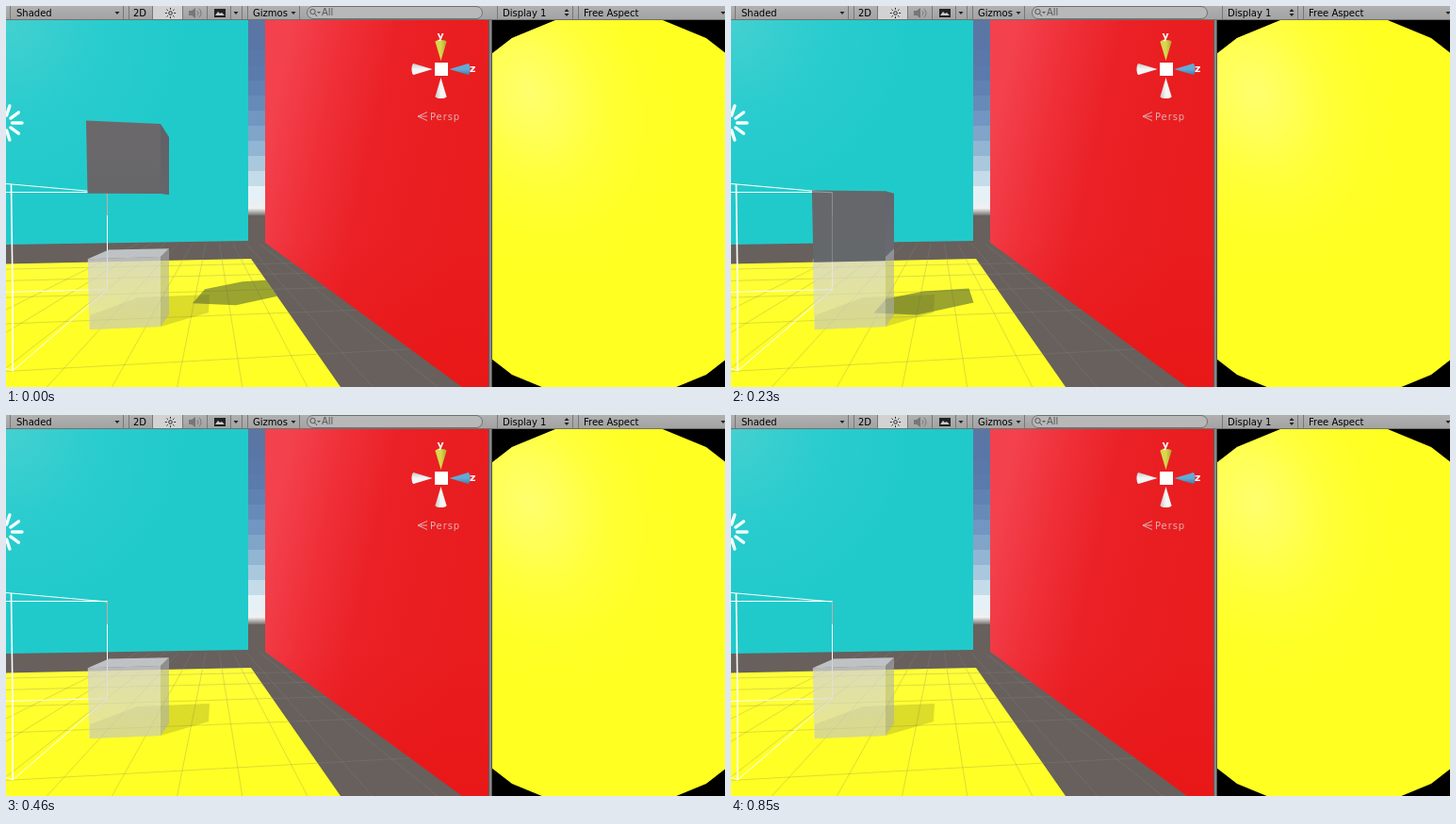
Write an HTML page with a canvas that moves like this. It is 763 by 404 pixels and loops after 1080 ms.

```html
<!DOCTYPE html>
<html>
<head>
<meta charset="utf-8">
<style>
html, body { margin: 0; width: 100%; height: 100%; overflow: hidden; background: #000 }
canvas { display: block }
</style>
</head>
<body>
<canvas id="stage" width="763" height="404"></canvas>
<script>
const c = document.getElementById('stage').getContext('2d');
const LOOP = 1080, POSE = 77, POSES = 5;   // ms per loop, ms per pose, poses of the fall
const HORIZON = 212, HEIGHT = 74;          // of the cubes

function rect(x, y, w, h, fill) {
  c.fillStyle = fill;
  c.fillRect(x, y, w, h);
}
function trace(p) {
  c.beginPath();
  for (let i = 0; i < p.length; i += 2) c.lineTo(p[i], p[i + 1]);
}
function poly(p, fill) {
  trace(p);
  c.fillStyle = fill;
  c.fill();
}
function line(p, color, width = 1) {
  trace(p);
  c.strokeStyle = color;
  c.lineWidth = width;
  c.stroke();
}
function arc(x, y, r, color, from = 0, to = 7) {
  c.beginPath();
  c.arc(x, y, r, from, to);
  c.strokeStyle = color;
  c.lineWidth = 1;
  c.stroke();
}
function ray(x, y, a, r1, r2, color, width) {
  const u = Math.cos(a), v = Math.sin(a);
  line([x + u * r1, y + v * r1, x + u * r2, y + v * r2], color, width);
}
function stops(g, list) {
  list.forEach((s, i) => g.addColorStop(i / (list.length - 1), s));
  return g;
}
const linear = (x1, y1, x2, y2, ...list) => stops(c.createLinearGradient(x1, y1, x2, y2), list);
const radial = (x, y, r, ...list) => stops(c.createRadialGradient(x, y, 0, x, y, r), list);
function text(s, x, y, color = '#000', size = 10, weight = '') {
  c.font = `${weight} ${size}px "DejaVu Sans", sans-serif`;
  c.fillStyle = color;
  c.fillText(s, x, y);
}
const arrow = (x, y, dir = 1) => poly([x - 2.5, y - dir, x + 2.5, y - dir, x, y + 2 * dir], '#222');

function toolbar() {
  rect(0, 0, 763, 15, linear(0, 0, 0, 15, '#b0b0b0', '#a2a2a2'));
  rect(156, 0, 31, 14, '#d2d2d2');
  rect(0, 14, 763, 1, '#707070');
  for (const x of [4, 124, 130, 155, 187, 213, 238, 250, 256, 311, 521, 601, 607]) rect(x, 0, 1, 14, '#777');
  text('Shaded', 11, 11);
  text('2D', 135, 11);
  text('Gizmos', 262, 11);
  text('Display 1', 527, 11);
  text('Free Aspect', 613, 11);
  for (const x of [118, 244, 305, 761]) arrow(x, 7);
  arrow(595, 9);
  arrow(595, 5, -1);

  // sun, speaker and picture buttons
  arc(174.5, 7.5, 1.8, '#222');
  for (let i = 0; i < 8; i++) ray(174.5, 7.5, i * Math.PI / 4, 3.8, 5.6, '#222', 1);
  poly([194, 5, 197, 5, 201, 2, 201, 13, 197, 10, 194, 10], '#777');
  arc(201, 7.5, 3, '#777', -.9, .9);
  arc(201, 7.5, 6, '#777', -.9, .9);
  rect(221, 3, 12, 9, '#222');
  poly([222, 10, 225, 6, 227, 8, 229, 7, 232, 10], '#ccc');

  // search field
  c.beginPath();
  c.roundRect(319.5, .5, 186, 13, 6.5);
  c.fillStyle = '#b8b8b8';
  c.fill();
  c.strokeStyle = '#707070';
  c.lineWidth = 1;
  c.stroke();
  arc(325.5, 6, 2.7, '#555');
  line([327.5, 8, 330, 11], '#555');
  poly([330, 6, 334, 6, 332, 8], '#555');
  text('All', 335, 10, '#555');
}

// Columns meet at one vanishing point, rows at another far to the right.
function grid(color) {
  for (let k = -2; k < 2.2; k += .36) line([220 + k * 40, HORIZON + 40, 220 + k * 200, HORIZON + 200], color);
  for (let d = .0057; d < .016; d += .0023) line([0, HORIZON + 1 / d, 3170, HORIZON], color);
}

function sky() {
  const bands = 12, h = 16;
  for (let i = 0; i < bands; i++) {
    const u = i / (bands - 1);
    rect(257, 15 + i * h, 18, h, `hsl(${218 - 20 * u * u} ${28 + 20 * u}% ${50 + 43 * u ** 2.4}%)`);
  }
  rect(257, 207, 18, 15, linear(0, 207, 0, 222, '#e8eff4', '#f0f0f0', '#77726f'));
}

function room() {
  rect(0, 15, 511, 389, '#67605d');
  sky();
  grid('rgba(150,145,142,.22)');
  poly([0, 15, 257, 15, 257, 249, 0, 253], radial(0, 15, 200, '#44d0d0', '#2accce', '#20caca'));
  const wall = [275, 15, 512, 15, 512, 404, 484, 404, 275, 251];
  poly(wall, linear(275, 140, 500, 190, '#f3424e', '#ef2f38', '#ea2126', '#e91e21', '#e91c1e'));
  poly(wall, linear(0, 250, 0, 404, 'rgba(232,20,20,0)', 'rgba(232,20,20,.6)'));
}

function floor(pose) {
  c.save();
  poly([0, 273.5, 260, 268, 355, 404, 0, 404], linear(0, 270, 0, 404, '#ffff3a', '#ffff28', '#ffff24'));
  c.clip();
  grid('rgba(130,130,90,.28)');
  poly([89, 343, 89, 328, 140, 309, 216, 306, 215, 325, 164, 340], 'rgba(110,110,30,.24)');
  if (pose < POSES) {
    c.translate(-15.5 * (pose - 2), 3.4 * (pose - 2));
    poly([167, 322, 180, 307, 220, 299, 268, 296, 273, 311, 213, 324], 'rgba(92,108,48,.62)');
  }
  c.restore();
}

// The far and left edges of a cube shrink or grow about the horizon.
function cube(top) {
  const at = (y, k) => HORIZON + (y - HORIZON) * k;
  const low = top + HEIGHT, lx = 85 + (top - 125) / 80, rx = 164;
  return {
    top,
    front: [lx, at(top, 1.04), rx, top, rx, low, lx + 1.5, at(low, 1.025)],
    side: [rx, top, 173, at(top, .84), 173, at(low, .9), rx, low],
    roof: [lx, at(top, 1.04), 109, at(top, .86), 173, at(top, .84), rx, top]
  };
}

function frustum(alpha) {
  c.globalAlpha = alpha;
  line([0, 188.5, 6, 189, 107.5, 198, 107.5, 300.5, 7, 387, 0, 384], '#fff');
  line([0, 197.5, 107.5, 197.5], '#fff');
  line([0, 303.5, 107.5, 300.5], '#fff');
  line([5.5, 189, 7, 300, 7, 387], '#fff', 1.6);
  line([107.5, 198, 107.5, 222], '#d0a8a4');
  c.globalAlpha = 1;
}

function cubes(pose) {
  const ghost = cube(266);
  const falling = pose < POSES && cube(125 + 20 * pose + 1.25 * pose * pose);
  poly(ghost.roof, 'rgba(204,208,212,.88)');
  if (falling) {
    poly(falling.side, linear(0, 120, 0, 290, '#606066', '#686c74'));
    if (falling.top > HORIZON) poly(falling.roof, '#777879');
  }
  poly(ghost.side, 'rgba(172,174,178,.58)');
  poly(ghost.front, linear(0, 266, 0, 343, 'rgba(210,211,212,.78)', 'rgba(216,216,208,.58)'));
  if (falling) {
    poly(falling.front, linear(0, 120, 0, 300, '#6b686a', '#66676a', '#64696b'));
    if (pose) frustum(.2);
  }
}

function cone(angle, light, dark) {
  c.save();
  c.translate(461.5, 67);
  c.rotate(angle);
  const fill = linear(0, -6, 0, 6, light, light, dark);
  poly([9, 0, 29, -6, 29, 6], fill);
  c.beginPath();
  c.ellipse(29, 0, 2, 6, 0, 0, 7);
  c.fill();
  c.restore();
}

function gizmos() {
  c.lineCap = 'round';
  for (let i = -2; i <= 2; i++) ray(-2, 124, i * Math.PI / 5, 8.5, 19, '#f4ffff', 3.4);
  c.lineCap = 'butt';
  cone(0, '#65a9d6', '#3b7faa');
  cone(Math.PI, '#f5f5f5', '#c8c8c8');
  cone(Math.PI / 2, '#f5f5f5', '#c8c8c8');
  cone(-Math.PI / 2, '#d8d84c', '#aeaa30');
  rect(455, 60, 14, 14, '#fff');
  text('y', 457.5, 35, '#fff', 11, 'bold');
  text('z', 492, 70, '#fff', 11, 'bold');
  const pale = '#dfb2b2';
  for (const y of [112.5, 117, 121.5]) line([437, 117, 447, y], pale);
  c.letterSpacing = '0.9px';
  text('Persp', 450, 121, pale);
  c.letterSpacing = '0px';
}

function gameView() {
  rect(512, 15, 4, 389, '#888');
  rect(512, 0, 1, 404, '#5c5c5c');
  rect(515, 0, 1, 404, '#555');
  rect(516, 15, 247, 389, '#000');
  c.save();
  c.beginPath();
  c.rect(516, 15, 247, 389);
  c.clip();
  const disc = [], sides = 24;
  for (let i = 0; i < sides; i++) {
    const a = i * 2 * Math.PI / sides;
    disc.push(640 + 206 * Math.cos(a), 212.5 + 206 * Math.sin(a));
  }
  poly(disc, '#ffff22');
  c.clip();
  c.translate(556, 92);
  c.rotate(-.35);
  c.scale(1, 1.35);
  rect(-300, -300, 600, 600, radial(0, 0, 150, 'rgba(255,255,124,.85)', 'rgba(255,255,110,.68)',
    'rgba(255,255,90,.4)', 'rgba(255,255,80,.15)', 'rgba(255,255,60,0)'));
  c.restore();
}

function draw(now) {
  const pose = Math.floor((now % LOOP + 5) / POSE);
  room();
  floor(pose);
  frustum(1);
  cubes(pose);
  gizmos();
  gameView();
  toolbar();
}

const start = performance.now();
function tick() {
  draw(performance.now() - start);
  requestAnimationFrame(tick);
}
tick();
</script>
</body>
</html>
```
